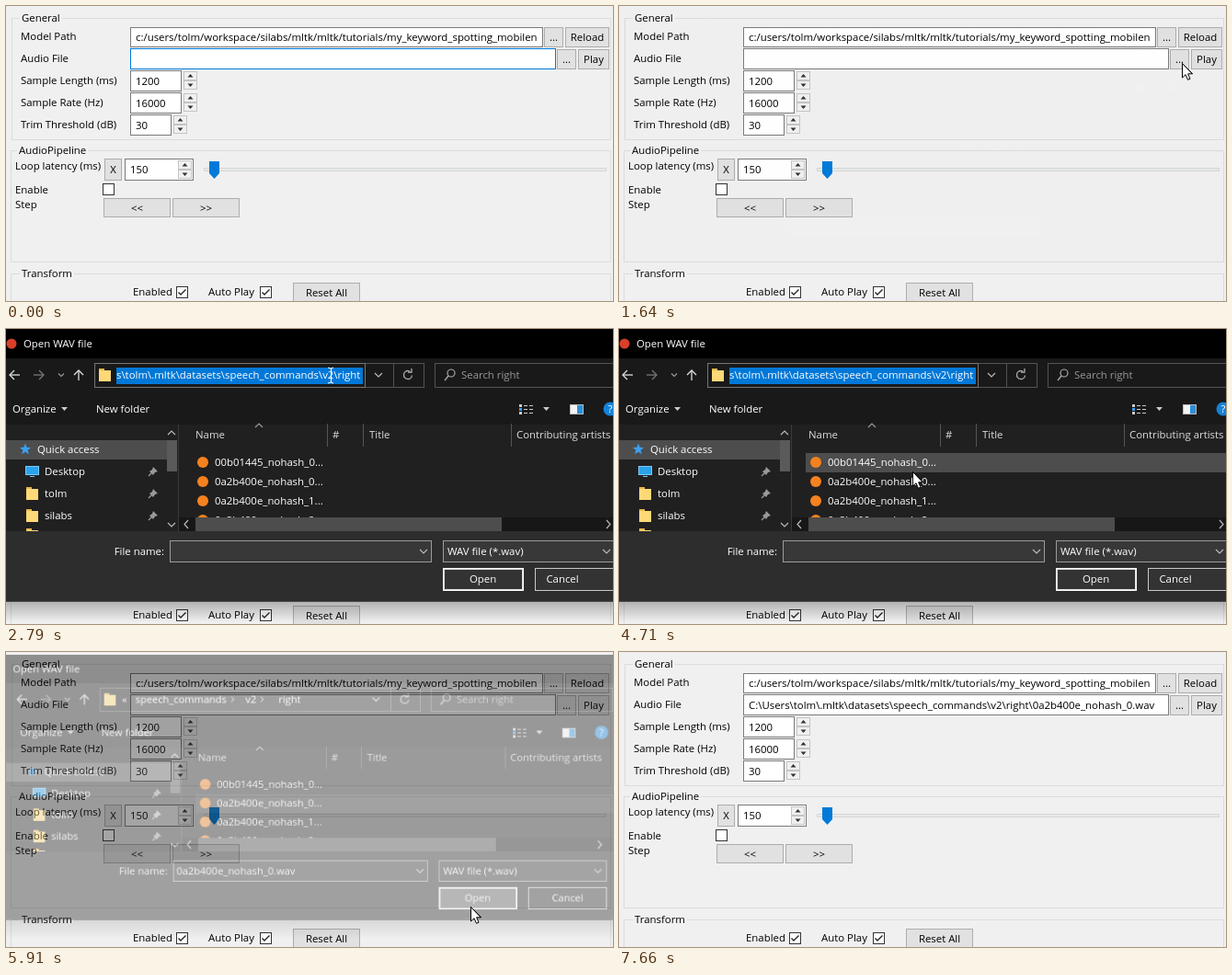
Write an HTML page with a canvas that moves like this. It is 660 by 321 pixels and loops after 7.69 s.

```html
<!DOCTYPE html>
<html lang="en">
<head>
<meta charset="utf-8">
<title>Open WAV file</title>
<style>
  html, body { margin: 0; width: 100%; height: 100%; overflow: hidden; background: #f0f0f0; }
  canvas { display: block; }
</style>
</head>
<body>
<canvas id="stage" width="660" height="321"></canvas>
<script>
const LOOP = 7690;
const EDGE = 24; // the dialog reaches this far beyond the left side of the stage
const WIDE = 720;
const screen2d = document.getElementById('stage').getContext('2d');
const layer = document.createElement('canvas');
layer.width = WIDE;
layer.height = 321;
const dialog2d = layer.getContext('2d');
dialog2d.translate(EDGE, 0);
let c = screen2d;

const FONT = '11.4px "Open Sans", "Noto Sans", sans-serif';
const BLUE = '#0078d7';
const MODEL = 'c:/users/tolm/workspace/silabs/mltk/mltk/tutorials/my_keyword_spotting_mobilen';
const WAV = String.raw`C:\Users\tolm\.mltk\datasets\speech_commands\v2\right\0a2b400e_nohash_0.wav`;
const ADDRESS = String.raw`s\tolm\.mltk\datasets\speech_commands\v2\right`;
const FILES = ['00b01445_nohash_0...', '0a2b400e_nohash_0...', '0a2b400e_nohash_1...', '0a2b400e_nohash_2...'];

// Moments at which the interface changes
const LOADED = 2000, EDIT = 2650, PICK = 4950, CLOSE = 5840, FILLED = 6060;

// Pointer stops: time, x, y
const STOPS = [
  [20, 600, 325], [480, 612, 63], [600, 612, 62], [730, 630, 62], [790, 630, 62], [910, 612, 62],
  [1950, 612, 62], [2390, 440, 52], [2620, 353, 50], [3220, 353, 50], [3600, 160, 54],
  [3970, 378, 54], [4160, 256, 49], [4360, 256, 49], [4710, 319, 155], [4850, 296, 166],
  [5130, 296, 166], [5560, 505, 277], [6530, 504, 277], [6770, 504, 128], [7040, 504, 128], [7280, 584, 325]
];

const clamp = v => Math.max(0, Math.min(1, v));
const mix = (a, b, p) => a + (b - a) * p;

function rect(x, y, w, h, fill, stroke) {
  if (fill) { c.fillStyle = fill; c.fillRect(x, y, w, h); }
  if (stroke) { c.strokeStyle = stroke; c.lineWidth = 1; c.strokeRect(x + .5, y + .5, w - 1, h - 1); }
}

function text(s, x, y, color = '#000', align = 'left') {
  c.font = FONT;
  c.fillStyle = color;
  c.textAlign = align;
  c.fillText(s, x, y + 4);
}

function path(points, color, width = 1, fill) {
  c.beginPath();
  for (let i = 0; i < points.length; i += 2) c.lineTo(points[i], points[i + 1]);
  if (fill) { c.closePath(); c.fillStyle = fill; c.fill(); }
  if (color) { c.strokeStyle = color; c.lineWidth = width; c.stroke(); }
}

function disc(x, y, r, fill, stroke) {
  c.beginPath();
  c.arc(x, y, r, 0, 7);
  if (fill) { c.fillStyle = fill; c.fill(); }
  if (stroke) { c.strokeStyle = stroke; c.lineWidth = 1.2; c.stroke(); }
}

// dir 1 points down, -1 points up
const chevron = (x, y, dir = 1, color = '#bbb', r = 4) =>
  path([x - r, y - dir * r / 2, x, y + dir * r / 2, x + r, y - dir * r / 2], color, 1.2);

/* ---------- main window ---------- */

function button(x, y, w, h, label, look) {
  const [fill, edge] = { hot: ['#e5f1fb', BLUE], down: ['#cce4f7', '#005499'], focus: ['#e1e1e1', BLUE] }[look] || ['#e1e1e1', '#adadad'];
  rect(x, y, w, h, fill, edge);
  text(label, x + w / 2, y + h / 2, '#000', 'center');
}

function field(x, y, w, h, value, edge = '#7a7a7a') {
  rect(x, y, w, h, '#fff', edge);
  text(value, x + 6, y + h / 2);
}

function spinner(x, y) {
  for (const dir of [-1, 1]) {
    const top = dir < 0 ? y : y + 10, mid = top + 5;
    rect(x, top, 15, 10, '#f0f0f0', '#c4c4c4');
    path([x + 4.5, mid - dir * 1.5, x + 10.5, mid - dir * 1.5, x + 7.5, mid + dir * 2], null, 1, '#333');
  }
}

function group(label, x, y, w, h, textX) {
  rect(x, y, w, h, null, '#dcdcdc');
  c.font = FONT;
  rect(textX - 2, y - 3, c.measureText(label).width + 4, 8, '#f0f0f0');
  text(label, textX, y);
}

function checkbox(x, y, on) {
  rect(x, y, 13, 13, '#fff', '#333');
  if (on) path([x + 2.5, y + 6.5, x + 5, y + 9, x + 10.5, y + 3.5], '#222', 1.4);
}

function mainWindow(t) {
  rect(0, 0, 660, 321, '#f0f0f0');
  group('General', 6, 13, 652, 133, 17);
  group('AudioPipeline', 5, 157, 653, 122, 14);
  group('Transform', 5, 291, 653, 60, 17);

  ['Model Path', 'Audio File', 'Sample Length (ms)', 'Sample Rate (Hz)', 'Trim Threshold (dB)']
    .forEach((s, i) => text(s, 16, 33 + 24 * i));
  field(135, 23, 449, 22, MODEL);
  button(585, 23, 21, 22, '...');
  button(608, 23, 48, 22, 'Reload');

  const cool = clamp((t - 20) / 380);
  field(135, 46, 463, 23, t >= FILLED ? WAV : '');
  if (cool < 1) {
    c.globalAlpha = 1 - cool;
    rect(135, 46, 463, 23, null, BLUE);
    c.globalAlpha = 1;
  }
  const pressed = t > 1370 && t < 1480;
  const hover = (t > 420 && t < 780) || (t > 860 && t < 1640);
  const focus = t > FILLED && t < 7660;
  button(599, 47, 21, 22, '...', pressed ? 'down' : hover ? 'hot' : focus ? 'focus' : '');
  button(622, 47, 34, 22, 'Play', t > 680 && t < 870 ? 'hot' : '');

  [['1200', 55], ['16000', 55], ['30', 44]].forEach(([v, w], i) => {
    field(135, 70 + 24 * i, w + 1, 23, v);
    spinner(138 + w, 71 + 24 * i);
  });

  text('Loop latency (ms)', 10, 174);
  button(107, 166, 19, 24, 'X');
  field(129, 166, 75, 24, '150');
  spinner(187, 168);
  rect(215, 176, 438, 4, '#e7eaea', '#d6d6d6');
  path([221, 169, 232, 169, 232, 182, 226.5, 188, 221, 182], null, 1, '#007ad9');
  text('Enable', 10, 200);
  checkbox(105, 193);
  text('Step', 10, 216);
  button(106, 209, 73, 21, '<<');
  button(181, 209, 73, 21, '>>');
  text('Enabled', 138, 311);
  checkbox(185, 305, true);
  text('Auto Play', 220, 311);
  checkbox(276, 305, true);
  button(312, 301, 73, 22, 'Reset All');
}

/* ---------- file dialog ---------- */

const band = (y, h, color) => rect(-EDGE, y, WIDE, h, color);

function folder(x, y) {
  rect(x, y, 6, 3, '#e8b64c');
  rect(x, y + 2, 13, 12, '#ffd978');
}

function star(x, y) {
  const points = [];
  for (let i = 0; i < 10; i++) {
    const a = i * Math.PI / 5 - Math.PI / 2, r = i % 2 ? 2.8 : 6.5;
    points.push(x + r * Math.cos(a), y + r * Math.sin(a));
  }
  path(points, null, 1, '#3aa0f0');
}

function pin(x, y) {
  path([x - 5, y + 5, x - 1, y + 1], '#999', 1.2);
  path([x, y - 5, x + 5, y, x + 2, y + 1, x, y + 4, x - 4, y, x - 1, y - 2], null, 1, '#999');
}

function paneAndHelp(x, y) {
  rect(x - 8, y - 5, 15, 11, '#f4f4f4', '#bbb');
  rect(x, y - 4, 6, 9, '#2b8fd8');
  disc(x + 36, y, 7.5, '#1583d8');
  text('?', x + 36, y, '#fff', 'center');
}

function listHeader(y) {
  chevron(275, y - 10, -1, '#999');
  [[206, 'Name'], [355, '#'], [395, 'Title'], [555, 'Contributing artists']].forEach(([x, s]) => text(s, x, y, '#ddd'));
  for (const x of [349, 388, 549]) rect(x, y - 12, 1, 25, '#555');
}

function clipped(x, y, w, h, draw) {
  c.save();
  c.beginPath();
  c.rect(x, y, w, h);
  c.clip();
  draw();
  c.restore();
}

function addressRow(t) {
  path([15, 50, 4, 50], '#ddd', 1.3);
  path([9, 45, 4, 50, 9, 55], '#ddd', 1.3);
  path([30, 50, 41, 50], '#777', 1.3);
  path([36, 45, 41, 50, 36, 55], '#777', 1.3);
  chevron(60, 50, 1, '#999', 3);
  path([79, 56, 79, 45], '#ddd', 1.3);
  path([74, 50, 79, 45, 84, 50], '#ddd', 1.3);

  rect(96, 37, 359, 27, '#191919', '#535353');
  folder(101, 43);
  if (t >= EDIT && t < PICK) {
    rect(96, 37, 295, 27, null, '#777');
    rect(120, 42, 268, 18, BLUE);
    text(ADDRESS, 120, 50, '#fff');
  } else {
    [[121, '«'], [136, 'speech_commands'], [259, 'v2'], [296, 'right']].forEach(([x, s]) => text(s, x, 50, '#fff'));
    for (const x of [245, 278]) path([x - 2, 47, x + 1, 50, x - 2, 53], '#ccc');
  }
  chevron(405, 50);
  rect(421, 38, 1, 25, '#535353');
  c.beginPath();
  c.arc(437, 50, 4.5, .1, 5.2);
  c.strokeStyle = '#aaa';
  c.lineWidth = 1.3;
  c.stroke();
  path([441, 43, 441, 47, 437, 47], '#aaa', 1.3);

  rect(466, 37, 204, 27, '#191919', '#535353');
  disc(484, 48, 4, null, '#aaa');
  path([481, 51, 477, 56], '#aaa', 1.3);
  text('Search right', 495, 50, '#999');
}

function toolbar() {
  text('Organize', 7, 87, '#fff');
  path([60, 85, 67, 85, 63.5, 89], null, 1, '#ccc');
  text('New folder', 98, 87, '#fff');
  for (let i = 0; i < 3; i++) {
    rect(558, 82 + 4 * i, 3, 3, i === 1 ? '#3aa0f0' : '#ccc');
    rect(563, 83 + 4 * i, 4, 1, '#ccc');
    rect(569, 83 + 4 * i, 4, 1, '#ccc');
  }
  path([584, 85, 591, 85, 587.5, 89], null, 1, '#ccc');
  paneAndHelp(621, 87);
}

function navigation(loading) {
  rect(-EDGE, 121, 175 + EDGE, 21, '#4d4d4d');
  star(21, 131);
  text('Quick access', 34, 131, '#fff');
  chevron(180, 113, -1);
  chevron(180, 213);
  rect(175, 121, 11, 34, '#5a5a5a');
  if (loading) {
    text('This PC', 34, 163, '#fff');
    text('Network', 34, 195, '#fff');
    return;
  }
  rect(21, 149, 15, 10, '#29a3ea', '#7cc9f5');
  rect(26, 160, 5, 1, '#7cc9f5');
  ['Desktop', 'tolm', 'silabs'].forEach((s, i) => {
    const y = 155 + 24 * i;
    if (i) folder(22, y - 7);
    text(s, 42, y, '#fff');
    pin(160, y);
  });
  clipped(0, 210, 175, 10, () => folder(22, 217));
}

function fileList(t, pointer) {
  const hovered = pointer.x > 203 && pointer.y < 205 ? Math.floor((pointer.y - 134.5) / 21) : -1;
  clipped(188, 134, 508, 71, () => FILES.forEach((name, i) => {
    const y = 145 + 21 * i;
    const picked = i === 1 && t >= PICK;
    if (i === hovered) rect(203, y - 10, 493, 21, picked ? '#777' : '#4d4d4d');
    else if (picked) rect(203, y - 10, 493, 21, '#333');
    disc(214, y, 6, '#f5821f');
    text(name, 227, y, '#fff');
  }));
}

function horizontalScroll() {
  rect(188, 205, 508, 15, '#171717');
  rect(206, 205, 333, 15, '#4d4d4d');
  path([198, 208, 194, 212.5, 198, 217], '#bbb', 1.2);
  path([653, 208, 657, 212.5, 653, 217], '#bbb', 1.2);
}

function dialogButton(x, label, labelX, edge, fill) {
  rect(x, 260, 88, 25, fill, edge);
  text(label, labelX, 272, '#fff', 'center');
}

function backdrop() {
  c.clearRect(-EDGE, 0, WIDE, 321);
  band(0, 297, '#191919');
  band(0, 32, '#000');
  band(104, 116, '#202020');
  band(220, 77, '#2d2d2d');
  band(296, 1, '#484848');
  const shadow = c.createLinearGradient(0, 297, 0, 319);
  shadow.addColorStop(0, 'rgba(0,0,0,.25)');
  shadow.addColorStop(1, 'rgba(0,0,0,0)');
  band(297, 22, shadow);
}

function loadingContent() {
  band(32, 89, '#2d2d2d');
  rect(188, 73, 445, 147, '#222');
  clipped(188, 58, 445, 15, () => listHeader(74));
  clipped(188, 90, 445, 130, () => listHeader(117));
  paneAndHelp(577, 47);
  paneAndHelp(577, 88);
  path([657, 12, 665, 20], '#fff');
  path([665, 12, 657, 20], '#fff');
  text('Working on it...', 371, 151, '#fff');
  rect(206, 205, 357, 15, '#4d4d4d');
  rect(119, 235, 54, 14, '#111');
  rect(178, 230, 285, 24, '#fff');
  rect(474, 260, 88, 25, '#151515');
  rect(575, 260, 62, 25, '#151515');
}

function loadedContent(t, pointer) {
  const openHot = pointer.x > 475 && pointer.y > 260;
  rect(187, 104, 1, 116, '#3a3a3a');
  addressRow(t);
  toolbar();
  listHeader(115);
  fileList(t, pointer);
  horizontalScroll();
  text('File name:', 172, 242, '#fff', 'right');
  rect(178, 230, 285, 24, '#383838', '#9b9b9b');
  if (t >= PICK) text('0a2b400e_nohash_0.wav', 182, 242, '#fff');
  chevron(454, 242);
  dialogButton(475, 'Open', 518.5, '#fff', openHot ? '#666' : '#333');
  rect(476, 261, 86, 23, null, '#ddd');
  dialogButton(575, 'Cancel', t >= CLOSE ? 619 : 605, '#c8c8c8', '#333');
}

function dialog(t, pointer) {
  const loading = t < LOADED, closing = t >= CLOSE;
  backdrop();
  if (!closing) disc(6, 16, 5.5, '#d8402a');
  text('Open WAV file', closing ? -1 : 19, 16, '#fff');
  if (loading) loadingContent();
  else loadedContent(t, pointer);
  navigation(loading);
  rect(475, 230, 188, 24, '#383838', '#9b9b9b');
  text('WAV file (*.wav)', 480, 242, '#fff');
  chevron(653, 242);
}

/* ---------- pointer ---------- */

function pointerAt(t) {
  const i = STOPS.findIndex(s => s[0] >= t);
  if (i < 0) return { x: 700, y: 400 };
  const b = STOPS[i], a = STOPS[Math.max(0, i - 1)];
  const p = i ? (t - a[0]) / (b[0] - a[0]) : 1;
  const e = p * p * (3 - 2 * p);
  return { x: mix(a[1], b[1], e), y: mix(a[2], b[2], e) };
}

function drawPointer(t, { x, y }) {
  c.save();
  c.translate(Math.round(x), Math.round(y));
  if (t > EDIT && t < 4500 && y < 64) {
    path([-3, -8, 0, -7, 3, -8], '#fff');
    path([0.5, -7, 0.5, 8], '#fff');
    path([-3, 9, 0, 8, 3, 9], '#fff');
  } else {
    path([.5, .5, .5, 16, 4, 12.7, 6.5, 18.3, 9, 17.2, 6.6, 11.8, 11.5, 11.8], '#000', 1, '#fff');
    path([.5, .5, 11.5, 11.8], '#000');
  }
  c.restore();
}

function render(t) {
  const pointer = pointerAt(t);
  c = screen2d;
  mainWindow(t);

  const opening = clamp((t - 1640) / 220);
  const closing = clamp((t - CLOSE) / 120);
  const alpha = opening * (1 - closing);
  if (alpha > 0) {
    c = dialog2d;
    dialog(t, pointer);
    c = screen2d;
    const scale = mix(.97, 1, opening) - .046 * closing;
    c.save();
    c.globalAlpha = alpha;
    c.translate(308, 105);
    c.scale(scale, scale);
    c.drawImage(layer, -308 - EDGE, -105);
    c.restore();
  }
  drawPointer(t, pointer);
}

function frame() {
  render(performance.now() % LOOP);
  requestAnimationFrame(frame);
}
frame();
</script>
</body>
</html>
```
